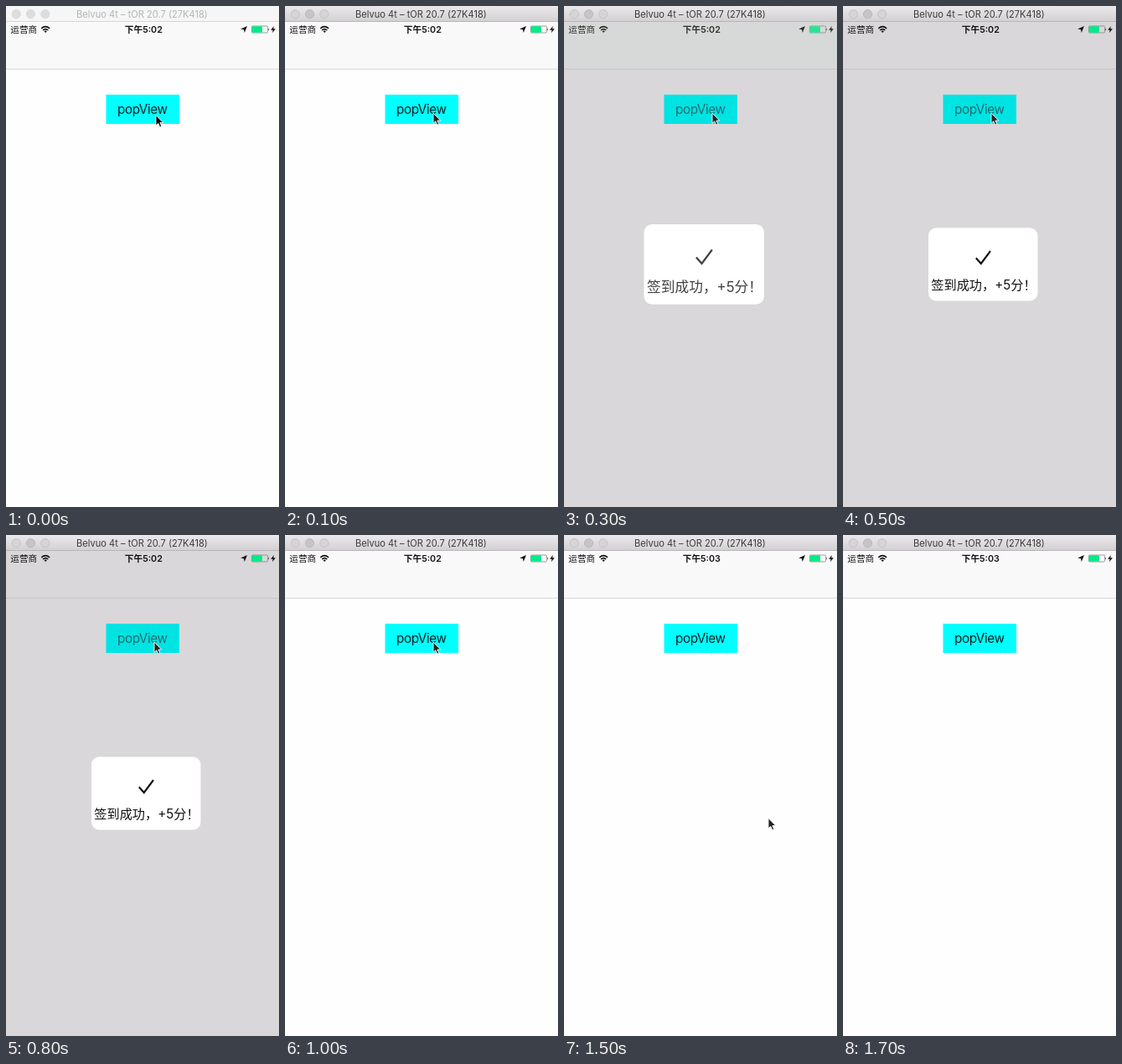
An HTML page that plays this animation: 326 by 599 pixels, repeating every 1.8 s.

```html
<!DOCTYPE html>
<html lang="zh-CN">
<head>
<meta charset="utf-8">
<title>popView</title>
<style>
html, body { margin: 0; width: 100%; height: 100%; overflow: hidden; background: #fefefe; }
svg { display: block; width: 326px; height: 599px; }
text { font-family: Inter, "Noto Sans CJK SC", "Noto Sans CJK", sans-serif; }
</style>
</head>
<body>
<svg viewBox="0 0 326 599">
  <defs>
    <linearGradient id="chrome" x2="0" y2="1">
      <stop offset="0" stop-color="#ebe9eb"/>
      <stop offset="1" stop-color="#d2d0d2"/>
    </linearGradient>
  </defs>

  <rect id="page" width="326" height="599"/>
  <rect id="nav" y="19" width="326" height="56"/>
  <rect id="navLine" y="75" width="326" height="1"/>

  <rect id="button" x="119.5" y="106" width="87.5" height="35"/>
  <text id="label" x="162.8" y="129.2" font-size="15.3" letter-spacing="-.4" text-anchor="middle">popView</text>

  <g id="status">
    <text x="5.3" y="32" font-size="10.6">运营商</text>
    <g fill="none" stroke="#111" stroke-width="1.6">
      <path d="M42.3 26.8Q47.2 22.6 52.1 26.8M44.1 29Q47.2 26.3 50.3 29"/>
      <path d="M47.2 32L45.4 30.1Q47.2 28.8 49 30.1Z" fill="#111" stroke="none"/>
    </g>
    <text id="clock" x="164.3" y="32" font-size="10.7" font-weight="600" text-anchor="middle"></text>
    <path d="M288 24L284.8 32 284 28.3 280.2 27.5Z"/>
    <rect x="293.4" y="24" width="19.2" height="8" rx="1.2" fill="none" stroke="#777" stroke-width=".7"/>
    <rect x="293.6" y="24.2" width="12.4" height="7.6" rx=".8" fill="#04ea88"/>
    <path d="M313.4 26.6Q315 28.1 313.4 29.6Z"/>
    <path d="M319.8 24L316.2 28.7H318.7L318 32.2 321.9 27.3H319.3Z"/>
  </g>

  <g id="card">
    <rect x="102" y="265.3" width="130.5" height="87.2" rx="9" fill="#fff"/>
    <g id="cardInk">
      <path d="M158.8 301.2L164.8 308 176 293" fill="none" stroke="#111" stroke-width="2.1"/>
      <text x="105.3" y="338.8" font-size="15.2" fill="#111">签到成功，+5分！</text>
    </g>
  </g>

  <rect id="bar" width="326" height="18.5"/>
  <rect id="barLine" y="18" width="326" height="1"/>
  <g id="lights">
    <circle cx="12.3" cy="9.7" r="5.1"/>
    <circle cx="29.5" cy="9.7" r="5.1"/>
    <circle cx="46.8" cy="9.7" r="5.1"/>
  </g>
  <text id="title" x="162.5" y="13.6" font-size="11.1" text-anchor="middle">Belvuo 4t – tOR 20.7 (27K418)</text>

  <path id="cursor" d="M0 0V12.4L2.8 9.8 4.7 14.2 6.8 13.3 4.9 9H8.8Z" stroke="#fff" stroke-width=".9" stroke-linejoin="round"/>
</svg>
<script>
const LOOP = 1800, STEP = 100;
const $ = id => document.getElementById(id);
const set = (id, attrs) => {
  for (const k in attrs) $(id).setAttribute(k, attrs[k]);
};
const clamp = v => Math.max(0, Math.min(1, v));
const mix = (a, b, p) => a + (b - a) * p;

function drawWindow(active) {
  set('bar', { fill: active ? 'url(#chrome)' : '#f6f6f6' });
  set('barLine', { fill: active ? '#b8b6b8' : '#d6d6d6' });
  set('title', { fill: active ? '#3c3b3c' : '#b4b4b4' });
  [...$('lights').children].forEach((dot, i) => {
    const middle = i === 1;
    dot.setAttribute('fill', !active ? '#dddddd' : middle ? '#c6c4c6' : '#d6d4d6');
    dot.setAttribute('stroke', !active ? '#d6d6d6' : middle ? '#b3b1b3' : '#bfbdbf');
    dot.setAttribute('stroke-width', .8);
  });
}

function drawPopup(t) {
  const shown = t >= 300 && t < 1000;
  const settle = clamp((t - 300) / 100);
  const scale = mix(1.1, 1, settle);
  set('page', { fill: shown ? '#d9d7d9' : '#fefefe' });
  set('nav', { fill: !shown ? '#f9f9f9' : settle < 1 ? '#d6d9d7' : '#d9d7d9' });
  set('navLine', { fill: shown ? '#c5c4c5' : '#d8d8d8' });
  set('button', { fill: shown ? '#00e3e3' : '#00ffff' });
  set('label', { fill: shown ? '#266b6d' : '#062020' });
  set('status', { opacity: shown ? mix(.85, 1, settle) : 1, fill: '#111' });
  set('card', {
    visibility: shown ? 'visible' : 'hidden',
    transform: `translate(167.3 309) scale(${scale}) translate(-167.3 -309)`
  });
  set('cardInk', { opacity: mix(.8, 1, settle) });
}

function drawCursor(t) {
  const enter = clamp(t / 100);
  const leave = clamp((t - 1400) / 200);
  const x = mix(mix(179, 177, enter), 311, leave);
  const y = mix(mix(130.5, 128, enter), 549, leave);
  set('cursor', {
    transform: `translate(${x} ${y})`,
    fill: t < 100 ? '#000' : '#222',
    visibility: t < 1700 ? 'visible' : 'hidden'
  });
}

function draw(ms) {
  const t = Math.floor((ms % LOOP) / STEP) * STEP;
  drawWindow(t >= 100);
  drawPopup(t);
  drawCursor(t);
  $('clock').textContent = t < 1200 ? '下午5:02' : '下午5:03';
}

const start = performance.now();
function tick() {
  draw(performance.now() - start);
  requestAnimationFrame(tick);
}
tick();
</script>
</body>
</html>
```
